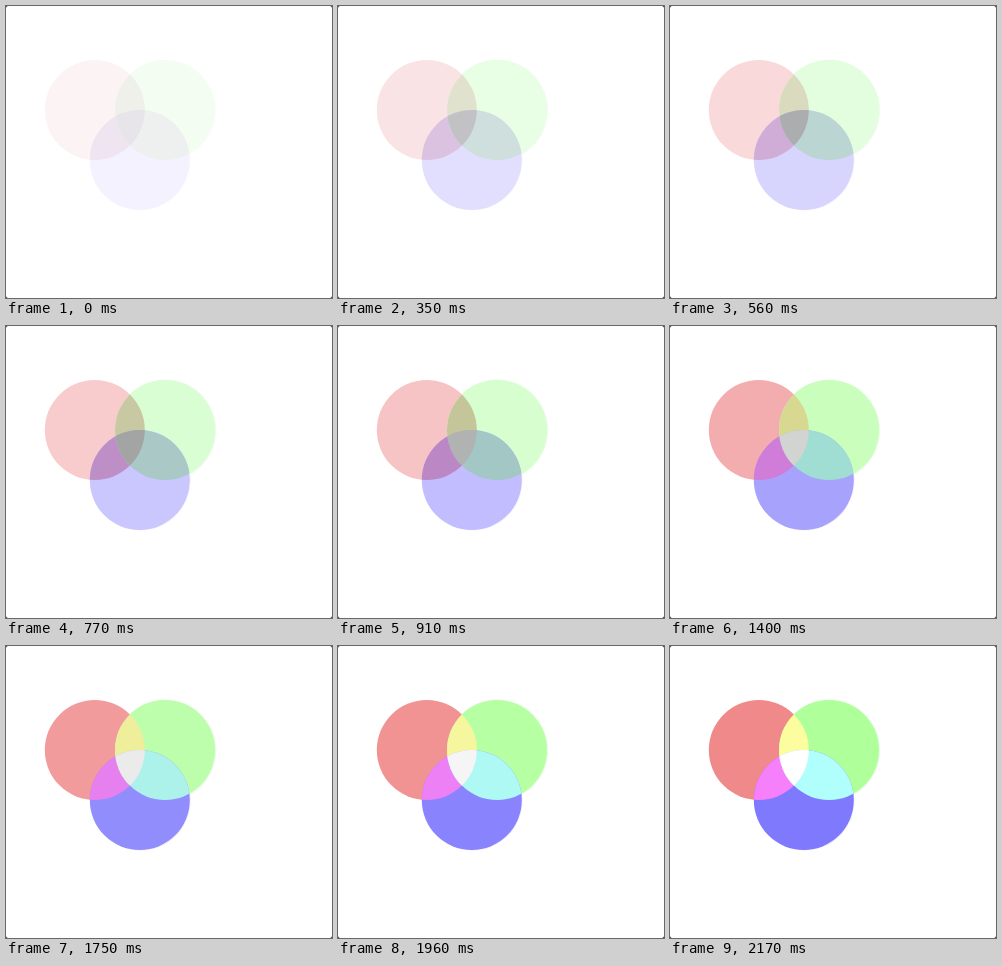
These frames come from a looping animation (326x292 px, 6020 ms). An HTML page without scripts:

```html
<!DOCTYPE html>
<html lang="en">
<head>
<meta charset="utf-8">
<title>Additive colour circles</title>
<style>
html, body { margin: 0; width: 100%; height: 100%; overflow: hidden; background: #000; }
svg { display: block; width: 326px; height: 292px; }

/* Each area passes through seven colours, one step every 70 ms, then holds. */
.mix { animation: mix 6020ms -2ms infinite; }
@keyframes mix {
  0%        { fill: var(--a); animation-timing-function: steps(8); }
  9.30233%  { fill: var(--b); animation-timing-function: steps(3); }
  12.7907%  { fill: var(--c); animation-timing-function: steps(5); }
  18.60465% { fill: var(--d); animation-timing-function: steps(4); }
  23.25581% { fill: var(--e); animation-timing-function: steps(5); }
  29.06977% { fill: var(--f); animation-timing-function: steps(6); }
  36.04651%, 100% { fill: var(--g); }
}

.red     { --a: #fbf3f4; --b: #f9d9da; --c: #f8cbcd; --d: #f6babb; --e: #f4adae; --f: #f29b9c; --g: #f0898a; }
.green   { --a: #f3fdf1; --b: #e2fede; --c: #dafed4; --d: #d1fec6; --e: #c9febc; --f: #bcfeac; --g: #afff9a; }
.blue    { --a: #f4f2fe; --b: #d7d4fe; --c: #cac6fe; --d: #b5affe; --e: #a7a2fc; --f: #928dfc; --g: #7f79fd; }
.yellow  { --a: #eef0e9; --b: #d9dabe; --c: #c8c8a3; --d: #c1c18c; --e: #d8d891; --f: #eeee9b; --g: #fbfd9f; }
.magenta { --a: #eee5f0; --b: #cfadd6; --c: #be8fc6; --d: #b97ac3; --e: #cf7dd9; --f: #e680ee; --g: #f67ffc; }
.cyan    { --a: #eef0f0; --b: #bbd5d2; --c: #a9c8c6; --d: #9bc6c4; --e: #a0ddd3; --f: #acf2ea; --g: #b0fffd; }
.white   { --a: #e7e5e9; --b: #acadaf; --c: #a3a5a5; --d: #c5c5c5; --e: #d2d4d2; --f: #ebebeb; --g: #ffffff; }

/* Faint rims under the green and blue discs */
.rim-g { --a: #fcfefb; --b: #f0fbee; --c: #edfbea; --d: #ebfbe7; --e: #ebfbe7; --f: #eafbe5; --g: #eafbe5; }
.rim-b { --a: #fefeff; --b: #f8f7ff; --c: #f5f5fe; --d: #f3f2fe; --e: #f1f0fe; --f: #efeefd; --g: #efeefd; }
</style>
</head>
<body>
<svg viewBox="0 0 326 292">
  <defs>
    <circle id="r" cx="88.8" cy="104" r="50"/>
    <circle id="g" cx="159" cy="104" r="50"/>
    <circle id="b" cx="133.8" cy="154" r="50"/>
    <clipPath id="inR"><use href="#r"/></clipPath>
    <clipPath id="inG"><use href="#g"/></clipPath>
  </defs>

  <rect width="326" height="292" rx="2" fill="#fff"/>

  <circle class="mix rim-g" cx="159.3" cy="104.3" r="50.8"/>
  <circle class="mix rim-b" cx="134.4" cy="154.4" r="50.2"/>

  <use class="mix red" href="#r"/>
  <use class="mix green" href="#g"/>
  <use class="mix blue" href="#b"/>

  <g clip-path="url(#inR)">
    <use class="mix yellow" href="#g"/>
    <use class="mix magenta" href="#b"/>
  </g>
  <g clip-path="url(#inG)">
    <use class="mix cyan" href="#b"/>
    <g clip-path="url(#inR)"><use class="mix white" href="#b"/></g>
  </g>
</svg>
</body>
</html>
```
